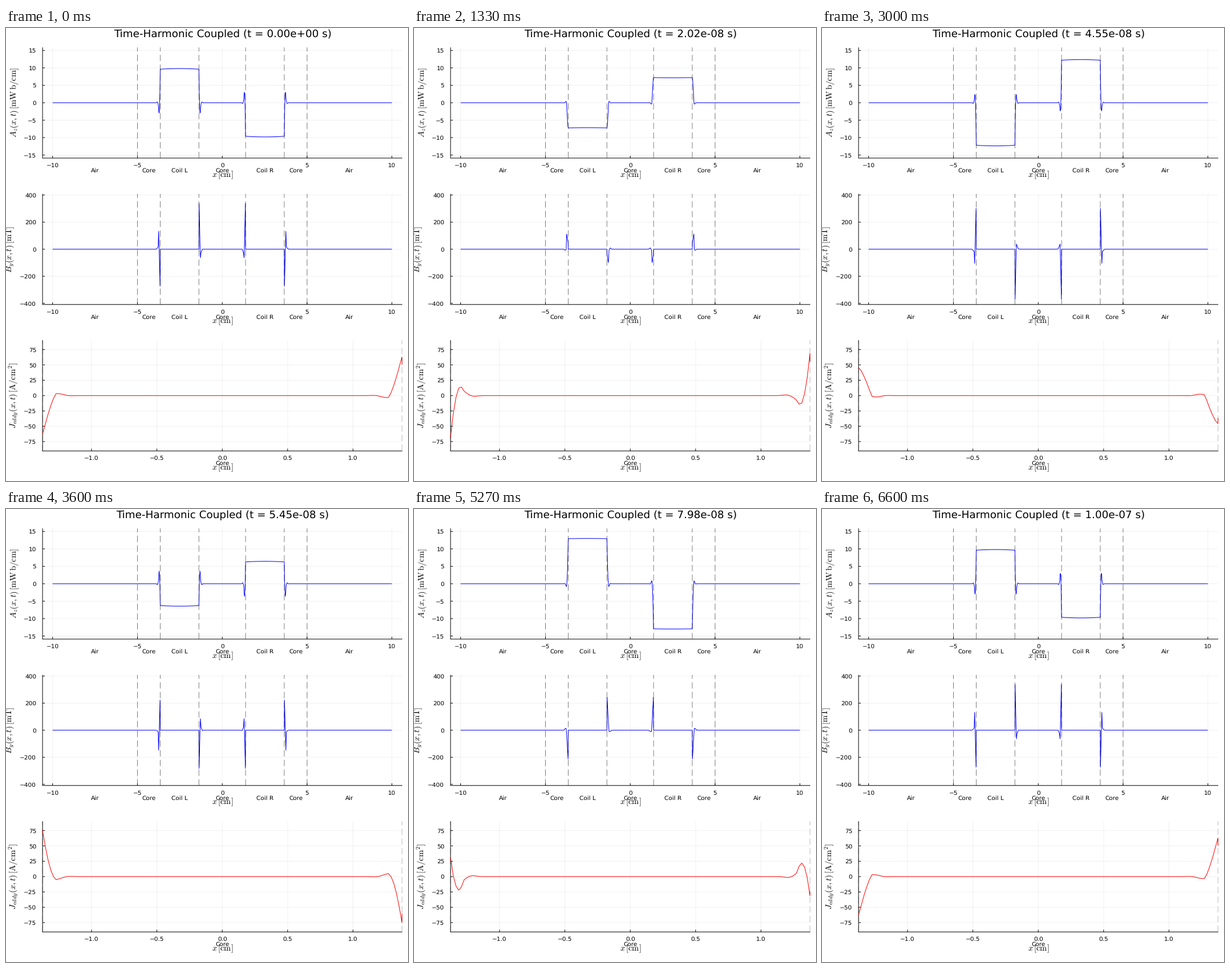
Write a matplotlib script that moves like this. It is 705x794 px and loops after 6670 ms.

```python
import numpy as np
import matplotlib.pyplot as plt
from matplotlib.animation import FuncAnimation

W, H, DPI = 705, 794, 100
STEPS, TICKS, LOOP_MS, PERIOD = 100, 334, 6670, 1e-7
PX = 72 / DPI  # points per pixel
MID, LEFT, RIGHT = 379.25, 64.1, 694.4
CORE, COIL = 1.375, 3.655  # inner and outer coil faces, cm

plt.rcParams.update({
    "font.family": "DejaVu Sans",
    "mathtext.fontset": "cm",
    "text.hinting": "none",
})

fig = plt.figure(figsize=(W / DPI, H / DPI), dpi=DPI, facecolor="white")
ax = fig.add_axes([0, 0, 1, 1])
ax.set_xlim(0, W)
ax.set_ylim(H, 0)
ax.axis("off")


def line(x, y, color="black", width=1.0, **kw):
    kw.setdefault("solid_capstyle", "butt")
    return ax.plot(x, y, color=color, lw=width * PX, snap=False, **kw)[0]


def text(x, y, s, size=10.5, ha="center", **kw):
    return ax.text(x, y, s, fontsize=size * PX, ha=ha, va="baseline", **kw)


def phasors(cos_part, sin_part):
    return np.array(cos_part) - 1j * np.array(sin_part)


class Panel:
    def __init__(self, zero, sx, sy, half=97):
        self.top, self.bottom, self.zero = zero - half, zero + half, zero
        self.sx, self.sy = sx, sy

    def px(self, x):
        return MID + self.sx * np.asarray(x)

    def py(self, y):
        return self.zero - self.sy * np.asarray(y)

    def frame(self, xticks, yticks, xfmt, label, label_x):
        grid = dict(color="black", alpha=0.06, zorder=1)
        for x in xticks:
            p = self.px(x)
            line([p, p], [self.top, self.bottom], **grid)
            line([p, p], [self.bottom - 4, self.bottom], zorder=2)
            text(p, self.bottom + 16, format(x, xfmt).replace("-", "\u2212"))
        for y in yticks:
            p = self.py(y)
            line([LEFT, RIGHT], [p, p], **grid)
            line([LEFT, LEFT + 4], [p, p], zorder=2)
            text(53.2, p + 3.9, str(y).replace("-", "\u2212"), ha="right")
        line([LEFT, LEFT], [self.top, self.bottom], zorder=2)
        line([LEFT - 0.5, RIGHT + 0.5], [self.bottom] * 2, zorder=2)
        text(MID, self.bottom + 33, r"$x\,[\mathrm{cm}]$", 14.6)
        text(label_x, self.zero, label, 14.7,
             rotation=90, rotation_mode="anchor")

    def walls(self, positions, alpha=0.5):
        for x in positions:
            p = self.px(x)
            line([p, p], [self.bottom, self.top], alpha=alpha, zorder=4,
                 dashes=(11, 6), dash_capstyle="butt")

    def regions(self, names, dy=25):
        for x, name in names:
            text(self.px(x), self.bottom + dy, name)


pot = Panel(131.0, 29.75, 6.11)
flux = Panel(387.7, 29.75, 0.2371)
eddy = Panel(644.3, 229.25, 1.0755)

wide = [-10, -5, 0, 5, 10]
pot.frame(wide, range(-15, 16, 5), "d",
          r"$A_z(x,t)\,[\mathrm{mW\,b/cm}]$", 18)
flux.frame(wide, range(-400, 401, 200), "d",
           r"$B_y(x,t)\,[\mathrm{mT}]$", 10)
eddy.frame([-1, -0.5, 0, 0.5, 1], range(-75, 76, 25), ".1f",
           r"$J_{eddy}(x,t)\,[\mathrm{A/cm^2}]$", 17)

parts = [(-7.5, "Air"), (-4.33, "Core"), (-2.515, "Coil L"), (0, "Core"),
         (2.515, "Coil R"), (4.33, "Core"), (7.5, "Air")]
for panel in (pot, flux):
    panel.walls([-5, -COIL, -CORE, CORE, COIL, 5])
    panel.regions(parts)
eddy.walls([-CORE, CORE], alpha=0.25)  # half hidden by the panel edge
eddy.regions([(0, "Core")])

# Eddy current in the core against depth from the coil face
depth = np.arange(14) * 0.0208
jz = phasors(
    [-63, -47, -31, -17, -5, 3.3, 3.1, 2.4, 1.4, 0.2, -0.2, -0.25, -0.15, 0],
    [-52.5, -16.7, 6.3, 17.9, 16.2, 6.5, 2.8, 0.3, -1.2, -1.2, -0.6, -0.3,
     0, 0])
jx = np.r_[depth - CORE, CORE - depth[::-1], CORE]
jz_all = np.r_[jz, -jz[::-1], -0.8 * jz[0]]

# Vector potential: skin profile in the cores, shallow parabola in the coil
skin = -1j * jz[1:] / 6
u = np.linspace(-1, 1, 31)
coil_x = -(COIL + CORE) / 2 + u * (COIL - CORE) / 2
coil_z = 9.8 - 0.18 * u**2 + 10.55j
ax_left = np.r_[-10, -COIL - depth[:0:-1], coil_x, -CORE + depth[1:]]
az_left = np.r_[0, skin[::-1], coil_z, skin]
ax_all = np.r_[ax_left, -ax_left[::-1]]
az_all = np.r_[az_left, -az_left[::-1]]

# Flux density: a spike at each coil face, mirrored about the centre
outer_s = np.array([0, 0.01, 0.094, 0.124, 0.185, 0.26])
outer_z = phasors([0, -275, 133, 18, 6, 0], [0, 139, 77, -9, -10, 0])
inner_s = np.array([0, 0.01, 0.087, 0.125, 0.2, 0.29])
inner_z = phasors([0, 340, -65, -25, 0, 0], [0, -150, -84.5, 3, 10, 0])
bx_left = np.r_[-10, -COIL - outer_s[::-1], -CORE + inner_s]
bz_left = np.r_[0, outer_z[::-1], inner_z]
bx_all = np.r_[bx_left, -bx_left[::-1]]
bz_all = np.r_[bz_left, bz_left[::-1]]

curves = []
for panel, x, z, color in ((pot, ax_all, az_all, "blue"),
                           (flux, bx_all, bz_all, "blue"),
                           (eddy, jx, jz_all, "red")):
    art = line(panel.px(x), panel.py(z.real), color, zorder=3,
               solid_joinstyle="miter")
    curves.append((art, panel, z))

title = text(380, 16, "", 18.35)


def update(i):
    # Ticks of 20 ms carry steps of 70, 60 and 70 ms
    step = min((3 * i + 2) // 10, STEPS - 1)
    turn = step / (STEPS - 1)
    spin = np.exp(2j * np.pi * turn)
    for art, panel, z in curves:
        art.set_ydata(panel.py((z * spin).real))
    title.set_text(f"Time-Harmonic Coupled (t = {turn * PERIOD:.2e} s)")
    return [art for art, _, _ in curves] + [title]


anim = FuncAnimation(fig, update, frames=TICKS, interval=LOOP_MS / TICKS,
                     repeat=True, repeat_delay=0, blit=False)
plt.show()
```
